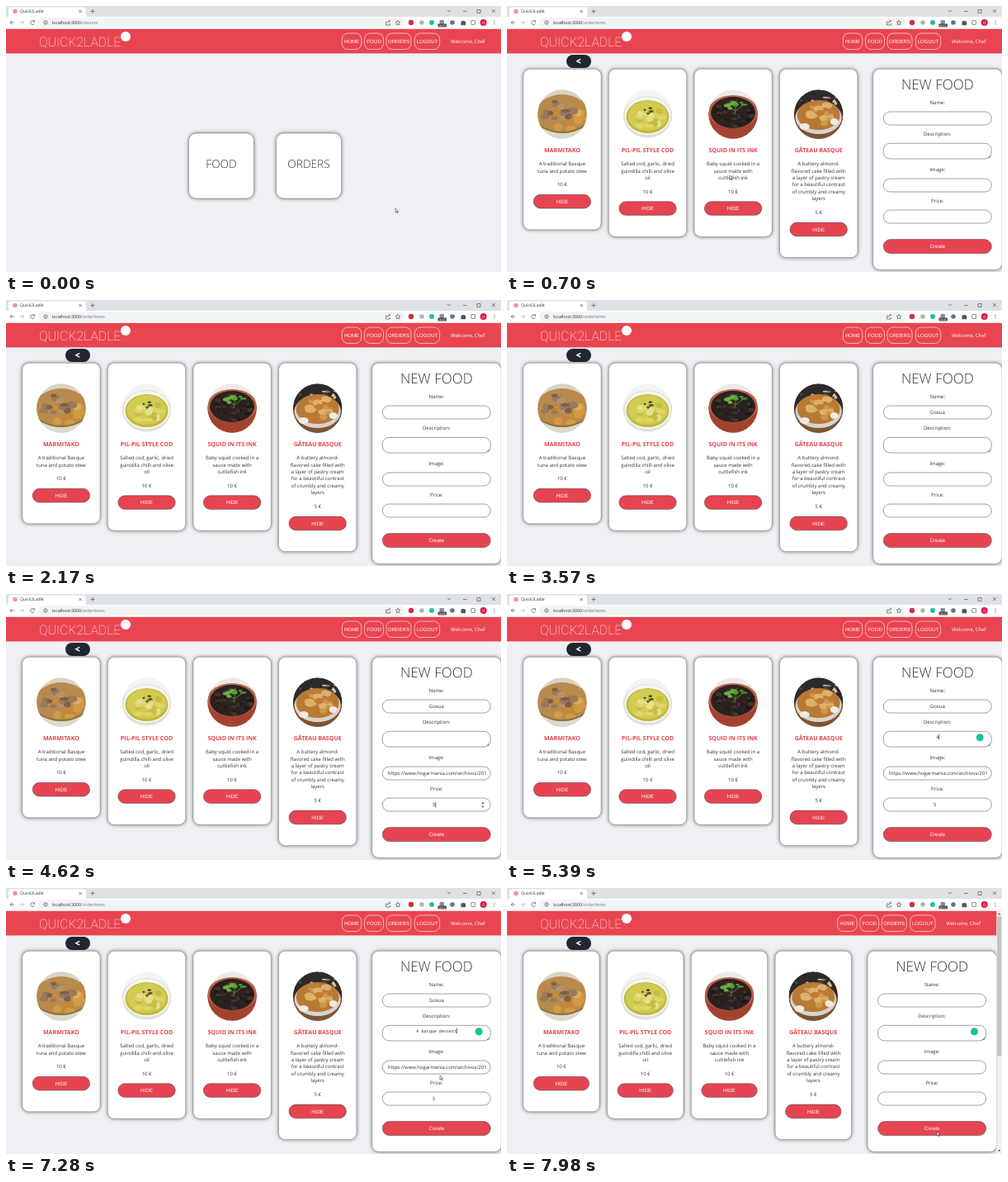
These frames come from a looping animation (600 px wide and 322 px high, 8000 ms). An HTML page:

```html
<!DOCTYPE html>
<html lang="en">
<head>
<meta charset="utf-8">
<title>Quick2Ladle</title>
<style>
html, body { margin: 0; width: 100%; height: 100%; overflow: hidden; }
svg { display: block; width: 600px; height: 322px; background: #eff0f3; }
text { font-family: "Open Sans", "Noto Sans", sans-serif; white-space: pre; text-rendering: geometricPrecision; }
.ui { font-family: "Liberation Sans", Arial, sans-serif; }
.mono { font-family: "Noto Sans Mono", monospace; }
.brand { font-family: Roboto, sans-serif; font-weight: 100; }
.light { font-weight: 300; }
.bold { font-weight: 700; }
.card { fill: #fff; stroke: #888; stroke-width: .6; filter: drop-shadow(0 .5px 2.2px #0008); }
.field { fill: #fff; stroke: #6c6c6c; stroke-width: .65; }
.button { fill: #e64451; stroke: #55474d; stroke-width: .6; }
.pill { fill: none; stroke: #fff; stroke-width: .6; }
.icon { fill: none; stroke: #666; stroke-width: .8; }
</style>
</head>
<body>
<svg id="stage" viewBox="0 0 600 322"></svg>
<script>
const LOOP = 8000, RED = '#e84550', INK = '#333';
const OPEN_MENU = 700, SUBMIT = 7910;
const IMAGE_URL = 'https://www.hogarmania.com/archivos/201';
const DESCRIPTION = 'A basque dessert';
const NAME_KEYS = [3010, 3080, 3220, 3290, 3430];

const rect = (x, y, w, h, r, attrs) =>
  `<rect x="${x}" y="${y}" width="${w}" height="${h}" rx="${r}" ${attrs}/>`;
const disc = (x, y, r, fill, ry = r, id = '') =>
  `<ellipse ${id && `id="${id}"`} cx="${x}" cy="${y}" rx="${r}" ry="${ry}" fill="${fill}"/>`;
const line = (d, attrs = 'class="icon"') => `<path d="${d}" ${attrs}/>`;
const label = (x, y, str, size, { fill = INK, cls = '', anchor = 'middle', id = '' } = {}) =>
  `<text ${id && `id="${id}"`} x="${x}" y="${y + size * .35}" font-size="${size}" fill="${fill}" class="${cls}" text-anchor="${anchor}">${str}</text>`;

function random(seed) {
  return () => (seed = seed * 16807 % 2147483647) / 2147483647;
}

// Small blobs inside an ellipse around (x, y)
function scatter(seed, count, x, y, spread, size, colors) {
  const rnd = random(seed);
  let out = '';
  for (let i = 0; i < count; i++) {
    const a = rnd() * 6.28, d = Math.sqrt(rnd()) * spread;
    out += disc(x + Math.cos(a) * d, y + Math.sin(a) * d * .7,
      size * (.6 + rnd()), colors[i % colors.length], size * (.4 + rnd() * .6));
  }
  return out;
}

const photos = [
  disc(0, 0, 30, '#d9d3c4') + disc(0, 1, 33, '#b98a4c', 25) +
    scatter(71, 16, 8, 5, 20, 5, ['#d39a43', '#dfae58', '#c5873a']) +
    scatter(37, 16, -5, -4, 19, 4.5, ['#9a7a5a', '#b39372', '#80614a']) +
    line('M-30 13Q0 33 30 13V30H-30Z', 'fill="#dcd9cd"') +
    line('M-30 12Q0 32 30 12', 'fill="none" stroke="#8d7442" stroke-width="2"'),
  disc(0, 0, 30, '#f4f4f2') + disc(0, 3, 30, '#e0e0dc', 25) + disc(0, 2, 28, '#f6f6f1', 23) +
    disc(0, 3, 26, '#beb93f', 20) + disc(0, 2, 24, '#d2cb51', 18) +
    scatter(29, 16, 0, 4, 18, 4, ['#ddd56a', '#c6be42', '#e6df8c']) +
    scatter(53, 8, 0, -4, 6, 1.5, ['#35401f', '#655927']),
  disc(0, 0, 30, '#eceae6') + disc(0, 5, 31, '#a3432f', 27) + disc(0, -3, 30, '#bd5f48', 20) +
    disc(0, -2, 27, '#2a2220', 19) + scatter(83, 34, 0, -1, 23, 2.5, ['#1d1715', '#43342d', '#352823']) +
    line('M2 0Q3-6 4-17M3-4l-9-5M3-4l9-7', 'fill="none" stroke="#4d8a2d"') +
    scatter(61, 10, 3, -12, 11, 2.6, ['#5a9b35', '#6fae45']),
  disc(0, 0, 30, '#2e2a2b') + scatter(17, 26, 0, -20, 24, 1.8, ['#8d7564', '#d2c3b0', '#54453e']) +
    disc(0, 8, 30, '#7f5434', 24) + disc(0, 4, 28, '#d8d2cd', 20) + disc(0, 1, 26, '#b87934', 18) +
    scatter(41, 18, 0, 0, 18, 4.5, ['#cf9649', '#deb06a', '#bd7c3a']) +
    disc(-17, 15, 6, '#eeeae6', 4) + disc(19, 9, 5, '#eeeae6', 4)
];

const dishes = [
  ['MARMITAKO', 10, 'A traditional Basque', 'tuna and potato stew'],
  ['PIL-PIL STYLE COD', 10, 'Salted cod, garlic, dried', 'guindilla chilli and olive', 'oil'],
  ['SQUID IN ITS INK', 10, 'Baby squid cooked in a', 'sauce made with', 'cuttlefish ink'],
  ['GÂTEAU BASQUE', 5, 'A buttery almond-', 'flavored cake filled with', 'a layer of pastry cream',
    'for a beautiful contrast', 'of crumbly and creamy', 'layers']
];

function browser() {
  return rect(0, 0, 600, 14, 0, 'fill="#dee1e6"') + rect(3, 1.5, 94, 16, 3, 'fill="#fff"') +
    rect(0, 13, 600, 14.8, 0, 'fill="#fff"') + disc(11, 6.5, 2.8, '#f0959b') +
    label(17, 6.6, 'Quick2Ladle', 5, { anchor: 'start' }) +
    line('M88.5 5l3.2 3.2m0-3.2l-3.2 3.2M102.5 6.5h5m-2.5-2.5v5') +
    line('M535 5l2 2 2-2M554 6.5h4.5M571 4.5h4v4h-4ZM589 4.2l4 4m0-4l-4 4') +
    line('M10 20H5m2.3-2.3L5 20l2.3 2.3M34 18.3a2.5 2.5 0 1 0 .5 2.8m0-3.8v2h-2') +
    line('M16.5 20h5m-2.3-2.3l2.3 2.3-2.3 2.3', 'fill="none" stroke="#b5b8bb" stroke-width=".8"') +
    rect(39, 14.3, 444, 11.5, 5.7, 'fill="#f1f3f4"') +
    '<circle cx="48" cy="20" r="2.2" class="icon"/>' + line('M48 19.5v1.8M48 18.3v.5') +
    `<text x="56" y="22" font-size="5.2" fill="#222">localhost:3000<tspan id="path" fill="#70757a"></tspan></text>` +
    line('M462 19h-1.5v4h5v-2m-3 0q0-3 3-3m-1.3-1.5l1.5 1.5-1.5 1.5') +
    line('M475 17.2l.9 2 2 .2-1.5 1.4.4 2-1.8-1-1.8 1 .4-2-1.5-1.4 2-.2Z') +
    disc(491, 20, 3.2, '#d22f3d') + disc(504, 20, 2.8, '#aeb8ae') + disc(516, 20, 2.9, '#15c39a') +
    rect(525.5, 17, 5.5, 5, 1, 'fill="#8b8f94"') + rect(523.5, 21.5, 10.5, 4, .8, 'fill="#4b4b50"') +
    label(528.7, 23.5, '', 3, { fill: '#fff', id: 'badge' }) + disc(541, 20, 2.8, '#57798c') +
    line('M551.5 18.5h1.5a1.3 1.3 0 0 1 2.4 0h1.6v1.7a1.3 1.3 0 0 1 0 2v1h-5.5Z', 'fill="#555"') +
    rect(563.8, 17.6, 4.6, 4.8, .5, 'class="icon"') + disc(578.7, 20, 4, '#d81b4a') +
    label(578.7, 20, 'O', 4.5, { fill: '#fff' }) + [18, 20, 22].map(y => disc(592, y, .6, '#555')).join('');
}

function header(shift) {
  const nav = [['HOME', 407.3, 23.5], ['FOOD', 434.5, 23], ['ORDERS', 461, 30], ['LOGOUT', 495.3, 30.4]];
  const links = nav.map(([str, x, w]) => rect(x, 33, w, 19.5, 7, 'class="pill"') +
    label(x + w / 2, 42.6, str, 6.1, { fill: '#fff', cls: 'ui' })).join('');
  return rect(0, 27, 600, 30.4, 0, `fill="${RED}"`) + disc(145, 37, 6, '#fff') +
    label(40, 43, 'QUICK2LADLE', 15.8, { fill: '#fff', cls: 'brand', anchor: 'start' }) +
    `<g transform="translate(${shift})">${links}${label(539, 42.5, 'Welcome, Chef', 6, { fill: '#fff', anchor: 'start' })}</g>`;
}

const home = () => header(0) + [['FOOD', 221.5], ['ORDERS', 327.5]].map(([str, x]) =>
  rect(x, 154, 79, 79, 9, 'class="card"') + label(x + 39.5, 191.5, str, 13.7, { cls: 'light' })).join('');

function dishCard([title, price, ...lines], i, step, width) {
  const x = 19.7 + i * step, mid = x + width / 2, grow = (lines.length - 2) * 8.45, bw = width - 25;
  return rect(x, 76.3, width, 194.5 + grow, 8, 'class="card"') +
    `<g transform="translate(${mid} 131)" clip-path="url(#round)">${photos[i]}</g>` +
    label(mid, 174.3, title, 7.1, { fill: '#e3434f', cls: 'bold' }) +
    lines.map((str, n) => label(mid, 191 + n * 8.45, str, 6)).join('') +
    label(mid, 216 + grow, price + ' €', 6) +
    rect(mid - bw / 2, 228.3 + grow, bw, 16.6, 8.3, 'class="button"') +
    label(mid, 236.7 + grow, 'HIDE', 6.2, { fill: '#fff', cls: 'ui' });
}

function menu(narrow) {
  const shift = narrow ? -6.7 : 0, step = narrow ? 101.8 : 103.6, width = narrow ? 92.4 : 94.4;
  const fields = [['Name:', 116.6, 128, 16], ['Description:', 154.8, 166.3, 18.7], ['Image:', 197.7, 209, 16], ['Price:', 236, 247, 16]];
  return header(shift) + rect(72, 59, 30, 16, 8, 'fill="#212730"') +
    line('M89.2 64.3l-4.4 2.4 4.4 2.4', 'fill="none" stroke="#fff" stroke-width="1.4"') +
    dishes.map((dish, i) => dishCard(dish, i, step, width)).join('') +
    `<g transform="translate(${shift})">` + rect(443.7, 76.3, 156.5, 243, 8, 'class="card"') +
    label(521.8, 95, 'NEW FOOD', 17, { cls: 'light' }) +
    fields.map(([str, ly, y, h]) => label(521.8, ly, str, 6) + rect(456.3, y, 131, h, 8, 'class="field"')).join('') +
    line('M582.8 184l3.2-3.2m-1.5 3.2l1.5-1.5', 'stroke="#444" stroke-width=".6"') +
    rect(456.3, 282.6, 131, 17, 8.5, 'class="button"') +
    label(521.8, 291, 'Create', 6.2, { fill: '#fff', cls: 'ui' }) + '</g>' +
    (narrow ? rect(593.3, 27.8, 6.7, 294.2, 0, 'fill="#f1f1f1"') + rect(594.2, 34.5, 5, 168.5, 0, 'fill="#c1c1c1"') +
      line('M595 32.2h3.4l-1.7-2ZM595 317h3.4l-1.7 2Z', 'fill="#555"') : '');
}

const $ = id => document.getElementById(id);
$('stage').innerHTML =
  `<defs><clipPath id="round"><circle r="29.8"/></clipPath>
  <clipPath id="urlBox"><rect x="462" y="209" width="120" height="16"/></clipPath></defs>
  <g id="home">${home()}</g><g id="wide">${menu(false)}</g><g id="narrow">${menu(true)}</g>
  <g id="entries">
    ${label(521.8, 136, '', 6, { id: 'name' })}
    ${label(521.8, 173, '', 5.1, { cls: 'mono', id: 'description' })}
    <g clip-path="url(#urlBox)">${label(462.8, 217.3, IMAGE_URL, 5.95, { anchor: 'start', id: 'image' })}</g>
    ${label(518.7, 255.3, '5', 6, { id: 'price' })}
    ${line('M576.3 254h3.4l-1.7-2.2ZM576.3 256.5h3.4l-1.7 2.2Z', 'id="spinner" fill="#555"')}
  </g>
  ${disc(0, 0, 4.5, '#15c39a', 4.5, 'assistant')}
  ${line('M0-3.3v6.6', 'id="caret" stroke="#222" stroke-width=".7"')}
  <g>${browser()}</g>
  ${line('M0 0v5l1.2-1.1.8 1.9.8-.4-.8-1.8h1.7Z', 'id="pointer" fill="#fff" stroke="#222" stroke-width=".5"')}
  ${line('M-1-3h2M0-3v6M-1 3h2', 'id="beam" stroke="#333" stroke-width=".5"')}`;

// Mouse stops: time, x, y
const stops = [
  [0, 472, 245], [140, 472, 245], [490, 270, 205], [760, 270, 205], [1260, 387, 260], [1330, 391, 262],
  [1610, 470, 180], [1960, 522, 137], [3500, 522, 137], [3920, 522, 217], [4340, 522, 217], [4480, 522, 255],
  [4700, 522, 255], [5110, 530, 175], [6930, 530, 175], [7700, 521, 295], [LOOP, 521, 295]
];

function mouseAt(t) {
  const i = stops.findIndex(s => s[0] > t), [t0, x0, y0] = stops[i - 1], [t1, x1, y1] = stops[i];
  const u = (t - t0) / (t1 - t0), e = u * u * (3 - 2 * u);
  return [x0 + (x1 - x0) * e, y0 + (y1 - y0) * e];
}

const show = (id, on) => $(id).style.display = on ? '' : 'none';
const place = (id, x, y) => $(id).setAttribute('transform', `translate(${x} ${y})`);
const between = (t, a, b) => t >= a && t < b;

function render(t) {
  const submitted = t >= SUBMIT;
  show('home', t < OPEN_MENU);
  show('wide', between(t, OPEN_MENU, SUBMIT));
  show('narrow', submitted);
  show('entries', !submitted);
  $('path').textContent = t < OPEN_MENU ? '/resume' : '/orderItems';
  $('badge').textContent = '00:' + String(5 + Math.floor(t / 1000)).padStart(2, '0');

  $('name').textContent = 'Goxua'.slice(0, NAME_KEYS.filter(k => k <= t).length);
  const typed = Math.max(0, Math.min(DESCRIPTION.length, Math.floor((t - 5320) / 110) + 1));
  $('description').textContent = DESCRIPTION.slice(0, typed);
  show('image', t >= 4060);
  show('price', t >= 4550);
  show('spinner', between(t, 4410, 4830));

  show('assistant', t >= 5250);
  place('assistant', submitted ? 566.5 : 573.2, 173.8);
  const describing = between(t, 5250, 7700);
  show('caret', describing || between(t, 4480, 4760));
  if (describing) place('caret', 521.8 + typed * 1.53 + .2, 173);
  else place('caret', 520.7, 255.3);

  const [x, y] = mouseAt(t);
  const overField = between(t, 3640, 3990) || between(t, 4340, 4450);
  const hidden = between(t, 1890, 3640) || between(t, 3990, 4340) || between(t, 4450, 4760) || between(t, 5110, 7000);
  show('beam', overField);
  show('pointer', !overField && !hidden);
  place('beam', x, y);
  place('pointer', x, y);
}

function tick() {
  render(performance.now() % LOOP);
  requestAnimationFrame(tick);
}
tick();
</script>
</body>
</html>
```
